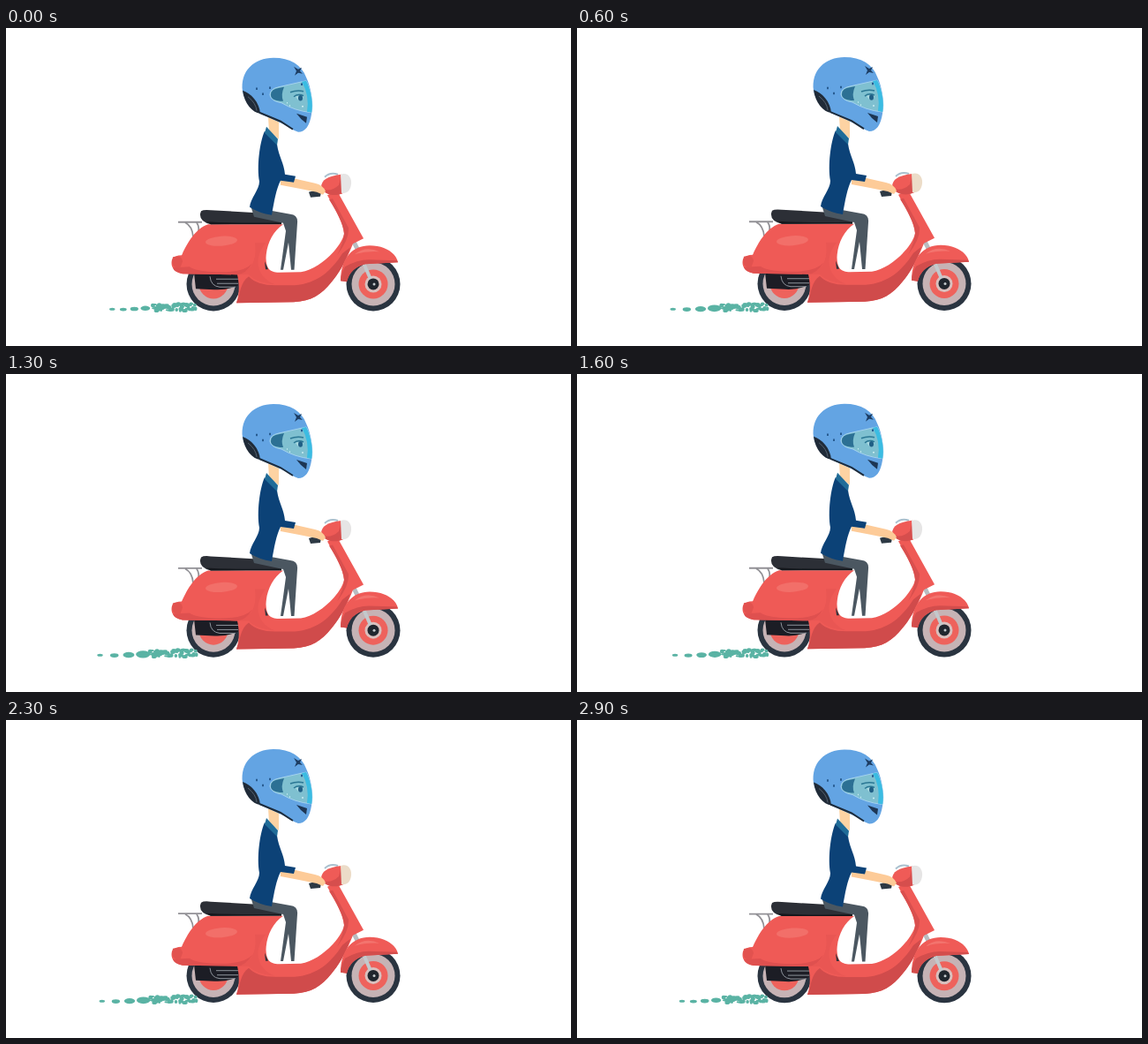
An HTML page for the animation above (3 s loop, 640 by 360 pixels).

```html
<!DOCTYPE html>
<html lang="en">
<head>
<meta charset="utf-8">
<title>Scooter ride</title>
<style>
  html, body { margin: 0; width: 100%; height: 100%; overflow: hidden; background: #fff; }
  svg { display: block; width: 100vw; height: 100vh; }
</style>
</head>
<body>
<svg viewBox="0 0 640 360">
  <defs>
    <g id="wheel">
      <circle r="30.5" fill="#2a3440"/>
      <circle r="24.5" fill="#c6b3b5"/>
      <circle r="16.5" fill="#ee625c"/>
      <circle r="9.500" fill="#d9c0be"/>
    </g>
  </defs>

  <g id="wheels">
    <use href="#wheel" x="235" y="290"/>
    <circle cx="235" cy="290" r="12" fill="#ee625c"/>
    <use href="#wheel" x="416" y="290"/>
    <path d="M405 266L415 289" stroke="#c3c9cc" stroke-width="4"/>
    <circle cx="416" cy="290" r="6.500" fill="#20262e"/>
    <circle cx="417" cy="290" r="1.500" fill="#c3c9cc"/>
  </g>

  <g id="scooter">
    <!-- engine and rack -->
    <path d="M213 277H265L263 291Q250 297 236 296L215 295Z" fill="#1c1d25"/>
    <path d="M231 281Q232 292 242 293H260M238 284H264M239 289H263" fill="none" stroke="#8d939b"/>
    <path d="M195 219.500H222M203 220Q211 224 212 236M216 220Q220 226 217 233" fill="none" stroke="#929196" stroke-width="1.800"/>
    <path d="M392 238L398 250" stroke="#b9bcc0" stroke-width="5"/>

    <!-- body -->
    <path d="M229 222H314C302 230 295 245 294.500 260C295 273 299 276 309 276.500L334 276C355 273 379 249 383 233C382 220 374 208 364 189L375 184L405 238L393 244C386 262 378 276 369 287C357 302 346 309 326 310L261 311C265 299 264 288 262 279L200 278C190 276 186 270 188 262Q191 257 199 257C205 244 214 227 229 222Z" fill="#ef5a56"/>
    <path d="M261 311C266 299 265 288 275 281Q284 291 305 291H327C353 289 369 274 381 255L390 248C385 264 377 278 369 287C357 302 346 309 326 310Z" fill="#d04b4b"/>
    <path d="M282 243C284 262 280 274 262 279H275Q283 288 305 290C286 284 278 263 294 243Z" fill="#e95653"/>
    <path d="M208 270Q214 275 238 276Q270 277 279 266Q272 278 262 279L200 278Q190 276 189 271Z" fill="#df504f"/>
    <path d="M383 232C382 221 375 208 366 194L370 193L388 226Q389 239 375 257Q382 244 383 232Z" fill="#d94f4e"/>
    <ellipse cx="244" cy="241" rx="18" ry="5.500" transform="rotate(-4 244 241)" fill="#f26f69"/>
    <path d="M189 259Q199 256 200 264L197 272Q188 271 188 264Z" fill="#e2524f"/>
    <path d="M293 264l4 9h-3z" fill="#30343c"/>

    <!-- front fender -->
    <path d="M379 286C379 262 391 246 412 246C430 246 442 255 444 265L407 267Q390 271 386 287Z" fill="#ef5b57"/>
    <path d="M379 286C379 281 381 275 384 270Q398 262 411 262L443 263L444 265L407 267Q390 271 386 287Z" fill="#d34d4c"/>
    <path d="M395 256Q407 246 423 253Q408 252 395 256Z" fill="#f3746e"/>

    <!-- seat -->
    <path d="M221 207Q224 205 232 206L302 210Q314 216 312 221L232 222Q219 219 220 210Z" fill="#2c2f36"/>
    <path d="M227 219Q260 221 312 220V222H232Z" fill="#15171c"/>
  </g>

  <g id="rider">
    <!-- handlebar and lamp -->
    <path d="M361 169Q367 163 376 166" fill="none" stroke="#a9c1cf" stroke-width="2"/>
    <path d="M357 181C357 172 364 168 380 166L382 187C374 191 361 190 357 181Z" fill="#ef5b57"/>
    <path d="M359 183Q369 186 377 178L380 167L382 187C374 191 363 190 359 183Z" fill="#d64e4d"/>
    <path id="lamp" d="M379 166C388 163 392 171 391 177C390 185 386 188 380 187Z"/>

    <!-- legs -->
    <path d="M277 201L300 207L322 211Q331 212 330 221L326.500 274H323L320 243L314 274H311L317 230L314 221L281 214Z" fill="#4b5761"/>

    <!-- arm and torso -->
    <path d="M297 101L309 106V126L298 117Z" fill="#fdd3a3"/>
    <path d="M343 186Q350 183 357 186L356 191L345 192Z" fill="#2d3944"/>
    <path d="M311 171L328 171L350 176Q359 178 362 185L359 189L352 186L332 182L311 178Z" fill="#fdcb98"/>
    <path d="M293 117L307 132C309 146 315 153 316 166L328 168L326 175L311 173C306 183 304 195 301 212Q287 210 276 203C277 193 287 183 287 174C284 158 287 130 293 117Z" fill="#0c4277"/>
    <path d="M295 112L308 126L307 133L293 119Z" fill="#206c98"/>

    <!-- helmet -->
    <path d="M268 72C265 49 281 34 303 34C322 34 335 42 340 56C346 68 348 86 346 98C344 111 339 118 331 118C324 116 320 111 312 108L288 97C279 94 271 85 268 72Z" fill="#63a4e3"/>
    <path d="M268 71C277 74 287 84 288 97C279 96 270 86 268 71Z" fill="#202b38"/>
    <path d="M274 78Q283 85 284 94" fill="none" stroke="#56616c"/>
    <path d="M287 96L311 106L325 115" fill="none" stroke="#1c2b3c" stroke-width="2"/>
    <path d="M299 76Q299 69 309 67L340 60C346 72 348 87 346 96Q327 94 312 85Q300 83 299 76Z" fill="#7fc0d0" stroke="#a4d2ef"/>
    <path d="M300 76Q300 69 310 68L315 67Q311 76 314 83Q300 83 300 76Z" fill="#2c7094"/>
    <path d="M335 61L340 60C346 72 348 87 346 96L341 95Q344 76 335 61Z" fill="#3bbce2"/>
    <path d="M322 73Q330 70 337 72M326 78Q331 74 337 77" fill="none" stroke="#2b7794" stroke-width="1.500"/>
    <path d="M328 78Q332 76 337 78Q335 83 331 82Z" fill="#a9d8e0"/>
    <ellipse cx="333.500" cy="79.500" rx="2.500" ry="3.300" fill="#205f85"/>
    <path d="M318 85h1M321 88h1M335 89h2" stroke="#c8edf2" stroke-width="1.500"/>
    <path d="M329 97L341 101L340 108Q334 104 329 97Z" fill="#1d3654"/>
    <path d="M326 44L331 47L335 45L333 49L336 52L331 51L327 54L329 49Z" fill="#1d3d63"/>
    <path d="M283 69h2M298 68h2M290 75h2M334 64h2" stroke="#285c91" stroke-width="2.500"/>
  </g>

  <path id="smoke" fill="#5ab3a4"/>
</svg>
<script>
  const STEP = 100, LOOP = 3000;
  const byId = id => document.getElementById(id);
  const frac = x => x - Math.floor(x);
  const noise = n => frac(Math.sin(n * 127.1 + 3.7) * 43758.545);

  const blob = (x, y, rx, ry) =>
    `M${x - rx} ${y}a${rx} ${ry} 0 1 0 ${2 * rx} 0a${rx} ${ry} 0 1 0 ${-2 * rx} 0`;

  // u runs from 0 to 1 while the trail stretches to the left
  function smokePath(u) {
    let d = "";
    for (let k = 0; k < 4; k++) {
      const x = 160 - 5 * u - k * (9.5 + 7 * u);
      const grow = (3 - k) * u;
      d += blob(x, 317 + 2 * noise(k), 3.2 + 1.7 * grow, 1.5 + 0.9 * grow);
    }
    for (let i = 0; i < 48; i++) {
      const p = i / 47, n = i * 3;
      const x = 169 - 6 * u + p * (45 + 8 * u);
      const y = 316.5 + (noise(n) - 0.5) * (7 + 3 * p);
      d += blob(x, y, 1.5 + 1.8 * noise(n + 1), 1.1 + 1.4 * noise(n + 2));
    }
    return d;
  }

  function draw(now) {
    const step = Math.floor((now % LOOP) / STEP);
    const lift = Math.cos(2 * Math.PI * (step * 14 / 30 - 0.74));
    const move = (id, y) => byId(id).setAttribute("transform", `translate(0 ${y.toFixed(2)})`);
    move("rider", -0.3 - 0.7 * lift);
    move("scooter", 0.2 - 0.5 * lift);
    move("wheels", -0.1 - 0.5 * lift);
    byId("lamp").setAttribute("fill", lift > 0.3 ? "#ecdcc8" : "#e6e5e5");
    byId("smoke").setAttribute("d", smokePath(frac(step * 0.588 - 0.7) ** 0.7));
    requestAnimationFrame(draw);
  }
  requestAnimationFrame(draw);
</script>
</body>
</html>
```
